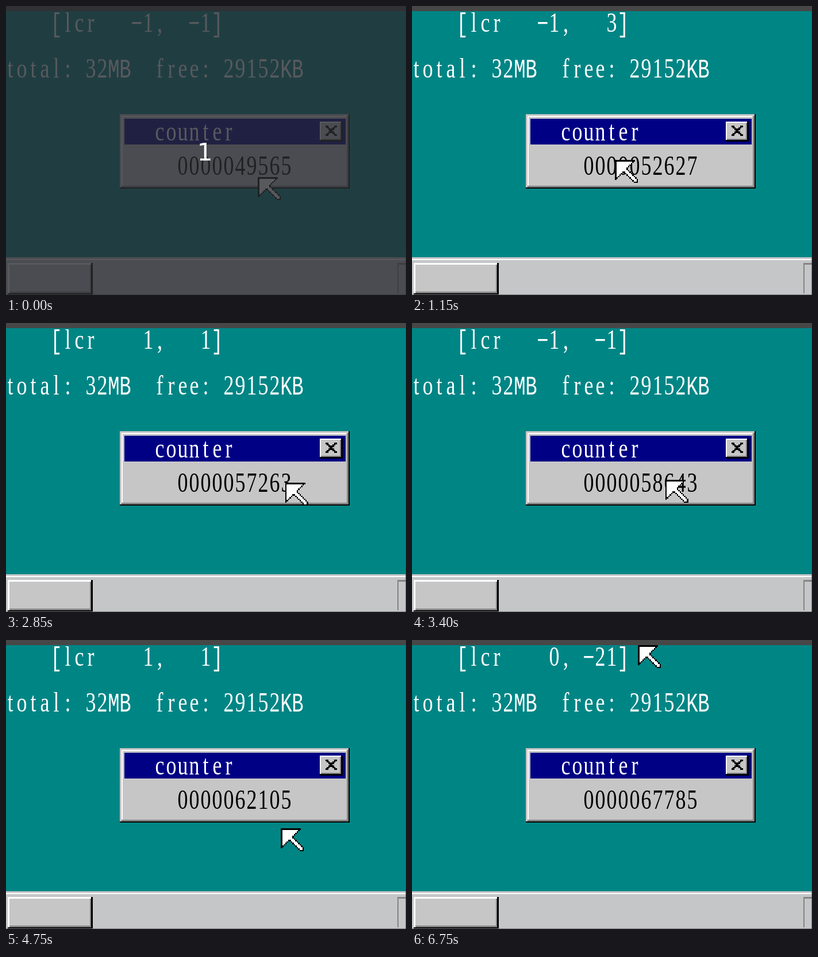
An HTML page with a canvas that plays this animation: 696 px wide and 505 px high, repeating every 6800 ms.

```html
<!DOCTYPE html>
<html lang="en">
<head>
<meta charset="utf-8">
<title>counter</title>
<style>
  html, body { margin: 0; width: 100%; height: 100%; overflow: hidden; background: #474747; }
  canvas { display: block; }
</style>
</head>
<body>
<canvas id="stage" width="696" height="505"></canvas>
<script>
const ctx = document.getElementById('stage').getContext('2d');
const LOOP = 6800, STEP = 50;
// The desktop is a 320 x 200 screen enlarged by U
const U = 2.5, OX = -2, OY = 9, W = 320, H = 200;
const GREY = '#c6c6c7', DARK = '#848484', BLACK = '#000', WHITE = '#fff';
const SERIF = '36px "Liberation Serif", serif';
const MONO = '34px "Liberation Mono", monospace';
const REPORT_MS = 15;

// ms, value
const COUNT = [[50, 49979], [1150, 52627], [2850, 57263], [4000, 60148], [5650, 64454], [6750, 67785]];

// ms, pointer x, y, and its speed per mouse report
const PATH = [
  [50, 176, 116, -1, -1], [1150, 142, 104, -1, 3], [2000, 210, 105, 1, 0], [2850, 195, 108, 1, 1],
  [4000, 174, 82, 2, 0], [4900, 205, 139, 2, 1], [5300, 262, 90, -2, -5], [5650, 158, 0, 0, -21]
];

// The two keys around t
function around(keys, t) {
  let i = 0;
  while (i < keys.length - 2 && t >= keys[i + 1][0]) i++;
  return [keys[i], keys[i + 1]];
}

function countAt(t) {
  if (t < STEP) return 49565;
  const [[t0, a], [t1, b]] = around(COUNT, t);
  return Math.round(a + (b - a) * (t - t0) / (t1 - t0));
}

// Cubic Hermite motion: position and speed of the mouse
function mouseAt(time) {
  const t = Math.min(Math.max(time, PATH[0][0]), PATH[PATH.length - 1][0]);
  const [p, q] = around(PATH, t);
  const n = (q[0] - p[0]) / REPORT_MS, s = (t - p[0]) / (q[0] - p[0]), r = 1 - s;
  const pos = [], speed = [];
  for (const k of [1, 2]) {
    const a = p[k], b = q[k], m0 = p[k + 2] * n, m1 = q[k + 2] * n;
    const v = r * r * (1 + 2 * s) * a + s * r * r * m0 + s * s * (3 - 2 * s) * b - s * s * r * m1;
    const dv = 6 * s * r * (b - a) + r * (1 - 3 * s) * m0 + s * (3 * s - 2) * m1;
    pos.push(Math.max(0, Math.round(v)));
    speed.push(Math.round(dv / n) || 0);
  }
  return { pos, speed };
}

// Picture rate of about 15 per second on a 50 ms grid
function snap(t) {
  const n = Math.floor(t / STEP);
  return (n % 4 === 2 ? n - 1 : n) * STEP;
}

// Filled box from (x0, y0) to (x1, y1), both ends included
function box(color, x0, y0, x1, y1) {
  const left = Math.round(OX + x0 * U), top = Math.round(OY + y0 * U);
  const right = Math.round(OX + (x1 + 1) * U), bottom = Math.round(OY + (y1 + 1) * U);
  ctx.fillStyle = color;
  ctx.fillRect(left, top, right - left, bottom - top);
}

// Tall type, one character per 8 x 16 cell
function text(str, x, y, color) {
  ctx.save();
  ctx.translate(OX + x * U, OY + y * U + 35.5);
  ctx.scale(1, 1.35);
  ctx.fillStyle = color;
  ctx.textAlign = 'center';
  ctx.textBaseline = 'alphabetic';
  [...str].forEach((c, i) => {
    ctx.font = /[A-Z\[\]\u2212]/.test(c) ? MONO : SERIF;
    ctx.fillText(c, (i * 8 + 4) * U - 0.5, 0);
  });
  ctx.restore();
}

function desktop() {
  ctx.fillStyle = '#474747';
  ctx.fillRect(0, 0, 696, 505);
  box('#008585', 0, 0, W - 1, H - 29);
  box('#c5c6c8', 0, H - 28, W - 1, H - 1);
  box(WHITE, 0, H - 27, W - 1, H - 27);
  box(GREY, 3, H - 23, 58, H - 5);
  box(WHITE, 3, H - 24, 59, H - 24);
  box(WHITE, 2, H - 24, 2, H - 4);
  box(DARK, 3, H - 4, 59, H - 4);
  box(DARK, 59, H - 23, 59, H - 5);
  box(BLACK, 2, H - 3, 59, H - 3);
  box(BLACK, 60, H - 24, 60, H - 3);
  box(DARK, W - 47, H - 24, W - 4, H - 24);
  box(DARK, W - 47, H - 23, W - 47, H - 4);
  ctx.fillStyle = 'rgba(70, 75, 75, .6)';
  ctx.fillRect(695, 9, 1, 496);
  ctx.fillRect(0, 504, 696, 1);
}

function panel(x, y, w, h, count) {
  const r = x + w - 1, b = y + h - 1;
  box(GREY, x, y, r, b);
  box(WHITE, x + 1, y + 1, r - 1, y + 1);
  box(WHITE, x + 1, y + 1, x + 1, b - 1);
  box(DARK, r - 1, y + 1, r - 1, b - 1);
  box(BLACK, r, y, r, b);
  box('#000084', x + 3, y + 3, r - 3, y + 20);
  box(DARK, x + 1, b - 1, r - 1, b - 1);
  box(BLACK, x, b, r, b);
  text('counter', x + 24, y + 4, WHITE);
  closeButton(x + w - 21, y + 5);
  text(String(count).padStart(10, '0'), x + 40, y + 28, BLACK);
}

function closeButton(x, y) {
  box(BLACK, x, y, x + 15, y + 13);
  box(WHITE, x, y, x + 14, y + 12);
  box(DARK, x + 1, y + 1, x + 14, y + 12);
  box(GREY, x + 1, y + 1, x + 13, y + 11);
  for (let i = -3; i <= 3; i++) {
    for (const k of [7 - i, 7 + i]) box(BLACK, x + k, y + 6 + i, x + k + 1, y + 6 + i);
  }
}

// A shrinking head and a diagonal tail; the white fill lies inside the black
function pointer(x, y) {
  for (const [color, inset] of [[BLACK, 0], [WHITE, 1]]) {
    const end = 15 - inset;
    for (let i = inset; i <= end; i++) {
      const row = (a, b) => { if (b >= a) box(color, x + a, y + i, x + b, y + i); };
      row(inset, 13 - inset - i);
      if (i > 4) row(i - 2 + inset, Math.min(end, i + 2 - inset));
    }
  }
}

function countdown() {
  ctx.fillStyle = 'rgba(42, 43, 48, .78)';
  ctx.fillRect(0, 0, 696, 505);
  ctx.fillStyle = WHITE;
  ctx.font = '42px "DejaVu Sans", sans-serif';
  ctx.textAlign = 'center';
  ctx.textBaseline = 'alphabetic';
  ctx.fillText('1', 346, 270);
}

function draw(time) {
  const t = snap(time);
  const { pos, speed } = mouseAt(t);
  const [dx, dy] = speed.map(v => String(v).replace('-', '\u2212').padStart(4));
  desktop();
  text(`[lcr ${dx},${dy}]`, 32, 0, WHITE);
  text('total: 32MB  free: 29152KB', 0, 32, WHITE);
  panel(80, 72, 160, 52, countAt(t));
  pointer(...pos);
  if (t < STEP) countdown();
}

const start = performance.now();
function tick(now) {
  draw(Math.max(0, now - start) % LOOP);
  requestAnimationFrame(tick);
}
draw(0);
requestAnimationFrame(tick);
</script>
</body>
</html>
```
